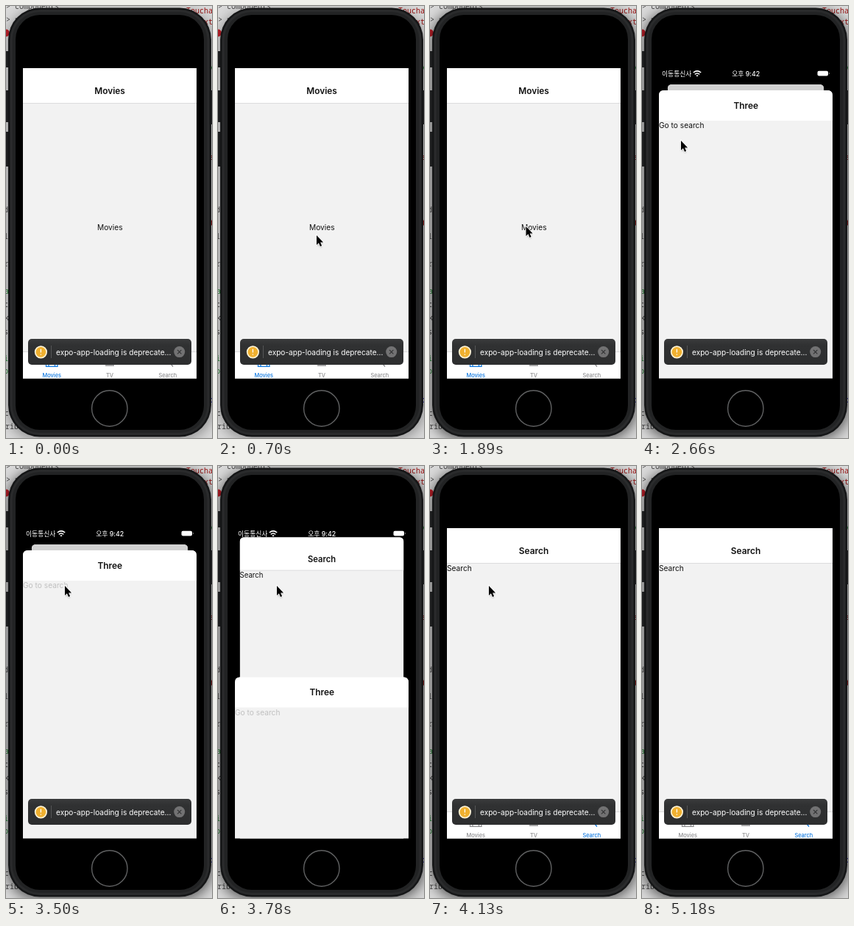
These frames come from a looping animation (280x584 px, 5530 ms). An HTML page:

```html
<!DOCTYPE html>
<html lang="en">
<head>
<meta charset="utf-8">
<style>
html, body { margin: 0; width: 100%; height: 100%; overflow: hidden; background: #000; }
svg { display: block; width: 280px; height: 584px; font: 10.2px Inter, Roboto, sans-serif; }
.title { font-size: 11.9px; font-weight: 600; text-anchor: middle; fill: #111; }
.tab { font-size: 7.4px; font-weight: 500; text-anchor: middle; }
.tab path { fill: none; stroke: currentColor; stroke-width: 1.3; }
.tab text { fill: currentColor; }
.status { font: 500 8.8px Inter, "Noto Sans CJK KR", "Noto Sans CJK", sans-serif; fill: #fff; }
.code { font: 10px "Noto Sans Mono", "DejaVu Sans Mono", monospace; }
</style>
</head>
<body>
<svg viewBox="0 0 280 584">
  <defs>
    <filter id="blur" x="-20%" y="-20%" width="140%" height="140%"><feGaussianBlur stdDeviation="9"/></filter>
    <filter id="soft" x="-50%" y="-50%" width="200%" height="200%"><feGaussianBlur stdDeviation="1"/></filter>
    <clipPath id="screen"><rect x="23" y="84" width="236" height="419.5"/></clipPath>
    <clipPath id="corners"><rect id="cardRect" x="23" y="84" width="236" height="440"/></clipPath>
    <linearGradient id="dark" x2="0" y2="1"><stop stop-color="#3a3b3c"/><stop offset=".25" stop-color="#303132"/><stop offset="1" stop-color="#2d2e2f"/></linearGradient>
    <g id="toast">
      <rect x="30" y="450" width="222" height="35" rx="5" fill="url(#dark)"/>
      <circle cx="47.4" cy="467.8" r="8.6" fill="#fff3d6"/>
      <circle cx="47.4" cy="467.8" r="6.9" fill="#f0b02f"/>
      <path d="M47.4 463.8v4.8M47.4 470.4v1.4" stroke="#fff" stroke-width="1.3"/>
      <path d="M61.5 459v17" stroke="#555657"/>
      <text x="68" y="471.6" font-size="10.1" fill="#fff">expo-app-loading is deprecate...</text>
      <circle cx="235.7" cy="467.6" r="7.5" fill="#727273"/>
      <path d="M233 464.9l5.4 5.4m0-5.4l-5.4 5.4" stroke="#303132" stroke-width="1.1"/>
    </g>
    <path id="arrow" d="M0 0V13L2.9 10.2L5 15L7.1 14.1L5.1 9.4H9.1Z"/>
  </defs>

  <rect width="280" height="584" fill="#dadada"/>
  <g id="code" class="code"></g>
  <circle cx="0" cy="36.5" r="5" fill="#c4202a"/>
  <rect id="shadow" x="1" y="6" width="280" height="580" rx="42" filter="url(#blur)"/>

  <path d="M2 61v22M2 114v43M2 170v47M279 114v46" stroke="#1c1d1e" stroke-width="5"/>
  <rect x="3" y="2.5" width="276" height="580" rx="43" fill="#151617"/>
  <rect x="5.5" y="5" width="271" height="575" rx="40.5" fill="#2a2b2c"/>
  <rect x="8.5" y="8" width="265" height="569" rx="37.5" fill="#222324"/>
  <rect x="13" y="12" width="256" height="561" rx="33"/>
  <circle cx="140.8" cy="544" r="24.2" fill="none" stroke="#606162" stroke-width="1.4"/>

  <g clip-path="url(#screen)">
    <g id="card"><g clip-path="url(#corners)">
      <rect x="23" y="84" width="236" height="440" fill="#f2f2f2"/>
      <rect x="23" y="84" width="236" height="47" fill="#fff"/>
      <path d="M23 131.5h236" stroke="#dcdcdd"/>
      <text id="cardTitle" class="title" x="141" y="119.3"></text>
      <text id="cardText" fill="#111"></text>
      <rect x="23" y="468" width="236" height="36" fill="#fff"/>
      <path d="M23 467.5h236" stroke="#dcdcdd"/>
      <g id="tabs">
        <g class="tab"><path d="M54.5 472h15.5v15.3h-15.5zM58 472v15M66.5 472v15M58 479h9"/><text x="62.3" y="501.6">Movies</text></g>
        <g class="tab"><path d="M133 473h16v10h-16zM135 486h12"/><text x="141" y="501.6">TV</text></g>
        <g class="tab"><path d="M224 477.5a5.5 5.5 0 1 1-11 0a5.5 5.5 0 1 1 11 0M222 481.5l5 6"/><text x="219.8" y="501.6">Search</text></g>
      </g>
      <use href="#toast"/>
      <rect id="dim" x="23" y="84" width="236" height="440" opacity=".18"/>
    </g></g>
    <g id="modal">
      <path d="M23 510V121q0-7 7-7h222q7 0 7 7v389z" fill="#f2f2f2"/>
      <path d="M23 155V121q0-7 7-7h222q7 0 7 7v34z" fill="#fff"/>
      <text class="title" x="141.3" y="138.5">Three</text>
      <text id="link" x="23" y="165" fill="#111">Go to search</text>
      <use href="#toast"/>
    </g>
    <g class="status">
      <text x="27" y="94.5">이동통신사</text>
      <text x="141.2" y="94.5" text-anchor="middle">오후 9:42</text>
      <path d="M69.8 90q5.2-4.4 10.4 0M71.8 92.3q3.2-2.6 6.4 0" fill="none" stroke="#fff" stroke-width="1.6"/>
      <path d="M73.4 93.9q1.6-1.3 3.2 0L75 95.5z"/>
      <rect x="238.5" y="87.8" width="14.5" height="6.7" rx="2"/>
      <path d="M254 89.8q1.4 1.3 0 2.6z"/>
    </g>
  </g>

  <g id="cursor">
    <circle id="ring" r="21.7" fill="none" stroke="#000" stroke-opacity=".75" stroke-width="2"/>
    <use href="#arrow" y="1.2" opacity=".4" filter="url(#soft)"/>
    <use href="#arrow" stroke="#fff" stroke-width="1.6"/>
    <use href="#arrow"/>
  </g>
</svg>
<script>
const $ = id => document.getElementById(id);
const LOOP = 5530, TICK = 70;
const OPEN = 2100, SWITCH = 3640, CLOSED = 4130;

// Cursor path: time, x, y
const path = [
  [280, 125, 484], [350, 125, 409], [420, 125, 409], [560, 130, 350], [630, 133, 320],
  [700, 134, 310], [980, 134, 308], [1050, 132, 299], [1190, 132, 299], [1260, 130.5, 298],
  [2310, 130.5, 298], [2380, 118, 270], [2450, 90, 225], [2520, 67, 197], [2660, 53, 182],
  [2800, 53, 182], [2870, 56, 180], [3010, 72, 166], [3150, 79, 161], [3220, 79, 161],
  [3290, 80, 162], [4270, 80, 162], [4340, 86, 215], [4410, 103, 360], [4480, 96, 443],
  [4620, 96, 443], [4690, 132, 566]
];
const clicks = [1050, 1680, 3290];

// Editor text peeking out around the phone
const code = [
  [0, 4, "> components", "#444"], [0, 22, "> n", "#444"],
  [-2, 132, "A", "#444"], [-3, 279, "dl", "#444"], [-3, 315, "ll", "#444"], [-3, 352, "rn", "#444"],
  [-2, 389, "a", "#283"], [-3, 407, "t.", "#333"], [-2, 425, "k", "#333"], [-3, 444, "s.", "#333"],
  [-3, 480, "ic", "#283"], [-3, 497, "or", "#283"], [-2, 554, "co", "#444"], [-7, 572, "tribe", "#444"],
  [245, 10, "Toucha", "#911"], [263, 25, "ext", "#911"], [277, 86, "/", "#283"],
  [277, 208, "s", "#911"], [277, 297, "t", "#911"], [277, 536, "c", "#22a"]
];
$("code").innerHTML = code.map(([x, y, s, c]) =>
  `<text x="${x}" y="${y}" fill="${c}">${s.replace(">", "&gt;")}</text>`).join("");

function cursorAt(t) {
  const i = path.findIndex(k => k[0] > t);
  if (i < 1) return path[path.length - 1].slice(1);
  const [t0, x0, y0] = path[i - 1], [t1, x1, y1] = path[i];
  const u = (t - t0) / (t1 - t0);
  return [x0 + (x1 - x0) * u, y0 + (y1 - y0) * u];
}

// How far the sheet has been dismissed: 0 open, 1 gone
function dismissal(t) {
  if (t < OPEN || t >= CLOSED) return 1;
  const a = Math.max(0, t - 3677) * .0145;
  return 1 - (1 + a) * Math.exp(-a);
}

const show = (id, on) => $(id).style.display = on ? "" : "none";
const attr = (id, name, value) => $(id).setAttribute(name, value);

function draw(ms) {
  const t = Math.floor(ms % LOOP / TICK) * TICK;
  const search = t >= SWITCH, p = dismissal(t);

  attr("shadow", "opacity", t < 1050 ? .35 : .6);

  $("cardTitle").textContent = $("cardText").textContent = search ? "Search" : "Movies";
  attr("cardText", "x", search ? 23 : 124);
  attr("cardText", "y", search ? 141.8 : 302.8);
  [...$("tabs").children].forEach((tab, i) =>
    tab.style.color = i === (search ? 2 : 0) ? "#1079e0" : "#8e8e90");

  attr("card", "transform", `translate(141 ${106 - 22 * p}) scale(${.9 + .1 * p}) translate(-141 -84)`);
  attr("cardRect", "rx", p < 1 ? 6 : 0);
  show("dim", p === 0);

  show("modal", p < 1);
  attr("modal", "transform", `translate(0 ${390 * p})`);
  attr("link", "opacity", t < 3360 ? 1 : t < 3430 ? .6 : .22);

  show("cursor", t >= 280 && t < 4760);
  attr("cursor", "transform", `translate(${cursorAt(t)})`);
  show("ring", clicks.some(c => t >= c && t < c + 210));
}

function frame() {
  draw(performance.now());
  requestAnimationFrame(frame);
}
frame();
</script>
</body>
</html>
```
